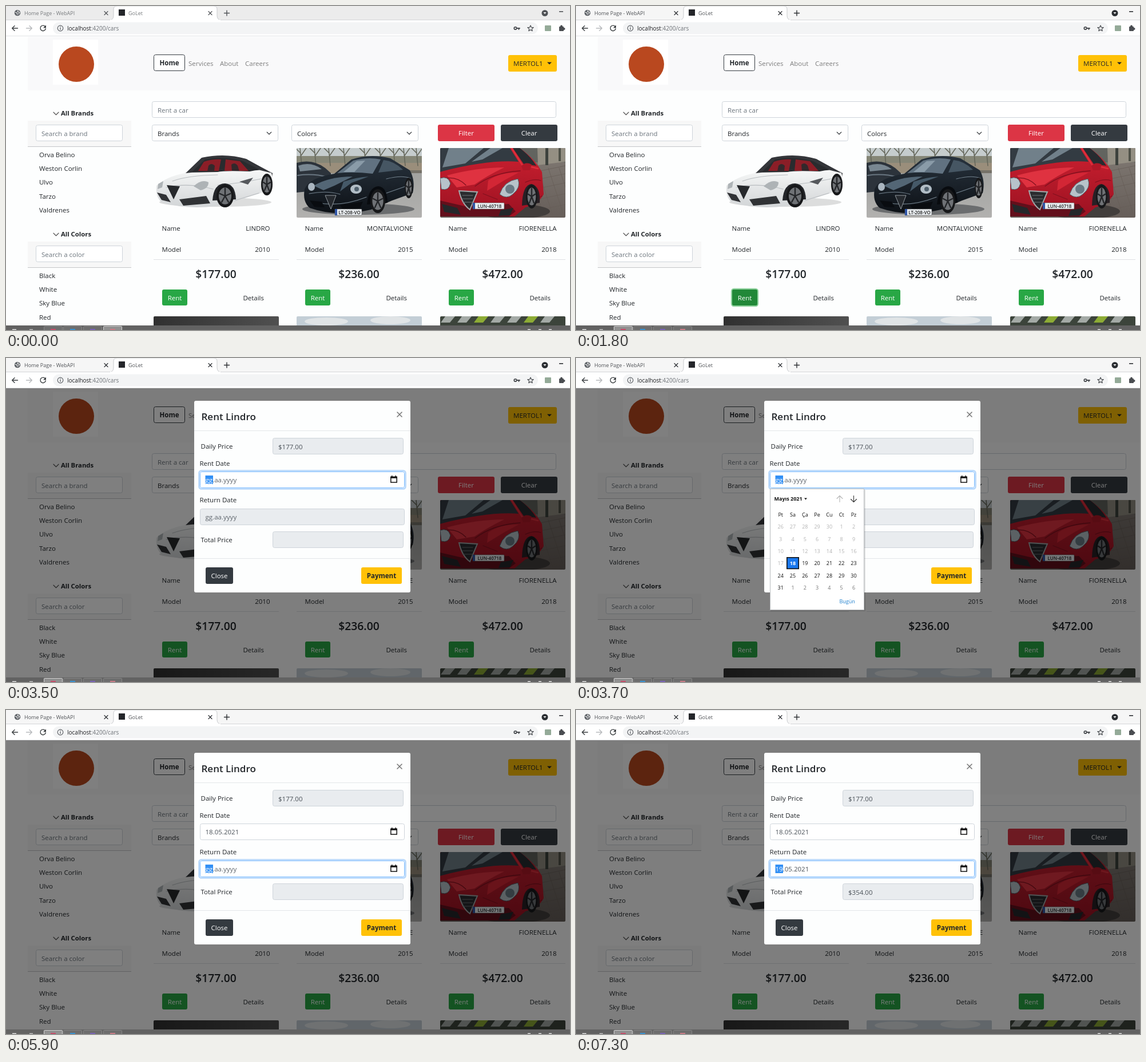
Write an HTML page that moves like this. It is 986 by 568 pixels and loops after 8000 ms.

```html
<!DOCTYPE html>
<html lang="en">
<head>
<meta charset="utf-8">
<title>Car rental</title>
<style>
html, body { margin: 0; width: 100%; height: 100%; overflow: hidden; background: #fff; }
svg { display: block; width: 100%; height: 100%; }
text { font: 11.5px "Open Sans", "Noto Sans", sans-serif; white-space: pre; }
</style>
</head>
<body>
<svg id="stage" viewBox="0 0 986 568"></svg>
<script>
const LOOP = 8000;
const INK = '#212529', GREY = '#6c757d', EDGE = '#ced4da', DARK = '#343a40', AMBER = '#ffc107';

const rect = (x, y, w, h, fill, r = 0, extra = '') =>
  `<rect x="${x}" y="${y}" width="${w}" height="${h}" rx="${r}" fill="${fill}" ${extra}/>`;
const box = (x, y, w, h, fill = '#fff', stroke = EDGE) =>
  rect(x + .5, y + .5, w - 1, h - 1, fill, 3, `stroke="${stroke}"`);
const path = (d, fill, extra = '') => `<path d="${d}" fill="${fill}" ${extra}/>`;
const line = (d, color = INK, width = 1.3) =>
  path(d, 'none', `stroke="${color}" stroke-width="${width}" stroke-linecap="round" stroke-linejoin="round"`);
const disc = (x, y, r, fill, extra = '') => `<circle cx="${x}" cy="${y}" r="${r}" fill="${fill}" ${extra}/>`;
const oval = (x, y, rx, ry, fill) => `<ellipse cx="${x}" cy="${y}" rx="${rx}" ry="${ry}" fill="${fill}"/>`;
const text = (x, y, s, fill = INK, size = 11.5, weight = 400, anchor = 'start') =>
  `<text x="${x}" y="${y}" fill="${fill}" text-anchor="${anchor}" style="font-size:${size}px;font-weight:${weight}">${s}</text>`;
const at = (x, y, body, extra = '') => `<g transform="translate(${x} ${y})" ${extra}>${body}</g>`;
const during = (from, to, body) => `<g data-from="${from}" data-to="${to}">${body}</g>`;
const button = (x, y, w, label, fill, color = '#fff', weight = 400, h = 29) =>
  rect(x, y, w, h, fill, 3) + text(x + w / 2, y + 19, label, color, 11.5, weight, 'middle');
const cross = (x, y, r, color, width) =>
  line(`M${x - r} ${y - r}l${2 * r} ${2 * r}m0 ${-2 * r}l${-2 * r} ${2 * r}`, color, width);
const chevron = (x, y, r = 3.8, color = INK) => line(`M${x - r} ${y - r / 2}l${r} ${r}l${r} ${-r}`, color, 1.2);
const fade = (id, from, to, down = 1) =>
  `<linearGradient id="${id}" x2="${1 - down}" y2="${down}"><stop stop-color="${from}"/><stop offset="1" stop-color="${to}"/></linearGradient>`;
const wheel = (x, y, rx, ry) => oval(x, y, rx, ry, '#17181a') + oval(x, y, rx * .74, ry * .74, '#6f7276') +
  [0, 1, 2, 3, 4].map(i => {
    const a = i * 1.257 - 1.57;
    return line(`M${x} ${y}l${rx * .66 * Math.cos(a)} ${ry * .66 * Math.sin(a)}`, '#25272a', 2.4);
  }).join('');
const plate = (x, y, w, s) => rect(x, y, w, 11, '#e9edf0', 1, 'stroke="#555" stroke-width=".6"') +
  rect(x, y, 4, 11, '#3157a8') + text(x + w / 2 + 2, y + 8.8, s, '#222', 8, 600, 'middle');

// The window is in the background at first and gains focus with the click.
const tabStrip = (strip, label, icon) =>
  rect(0, 0, 986, 25, strip) + line('M0 24.5H182M374 24.5H986', '#d3d5d8', 1) +
  path('M181 25Q188 24 188 17V6Q188 0 194 0H363Q369 0 369 6V17Q369 24 376 25Z', '#fff', 'stroke="#c9cbce"') +
  disc(20, 12, 5.3, '#5f6368') + line('M16 11l3 1l1 3M21 8l-1 2l4 1l-2 3', strip, 1.2) +
  text(32, 15.5, 'Home Page - WebAPI', label, 9) + text(214, 15.5, 'GoLet', label, 9) +
  cross(175, 12.5, 3, icon, 1.2) + cross(357, 12.5, 3, icon, 1.2) + line('M381.5 12.5h9M386 8v9', icon, 1.4) +
  disc(942, 12.5, 5.5, icon) + path('M939.5 11h5l-2.5 3z', '#fff') + rect(967, 9, 7, 1.6, icon);

function browser() {
  return during(0, 1800, tabStrip('#ececec', '#777a7d', '#505357')) +
    during(1800, LOOP, tabStrip('#f6f6f6', '#505357', '#2c2f33')) +
    rect(197, 6, 11, 11, '#24262a') + rect(0, 25, 986, 28, '#fff') + rect(182, 24, 193, 2, '#fff') +
    line('M20.5 39H11M15 34.7L10.7 39L15 43.3', '#3c4043', 1.4) +
    line('M35.5 39H45M41 34.7L45.3 39L41 43.3', '#b8babd', 1.4) +
    line('M68.5 36A4.7 4.7 0 1 0 69.3 40', '#3c4043', 1.4) + path('M70 33.5v5h-5z', '#3c4043') +
    rect(82, 28.5, 848, 21, '#f3f4f5', 10.5) +
    disc(95, 39, 4.8, 'none', 'stroke="#5f6368" stroke-width="1.2"') + rect(94.4, 38, 1.3, 3.8, '#5f6368') +
    rect(94.4, 35.8, 1.3, 1.3, '#5f6368') +
    text(107, 43, 'localhost<tspan fill="#6b6f74">:4200/cars</tspan>', '#202124', 10) +
    disc(890.5, 39, 2.2, 'none', 'stroke="#4a4d51" stroke-width="1.8"') + line('M893 39h5M896.5 39v2', '#4a4d51', 1.9) +
    line('M917 34l1.5 3.4l3.6 .3l-2.8 2.4l.9 3.6l-3.2-2l-3.2 2l.9-3.6l-2.8-2.4l3.6-.3z', '#4a4d51', 1.2) +
    rect(942, 34, 11, 10, '#94aa98', 1) +
    rect(967, 36, 8, 8, '#4a4d51', 1) + disc(971, 35.6, 2, '#4a4d51') + disc(975.5, 40, 2, '#4a4d51') +
    rect(0, 52, 986, 1, '#e3e4e6');
}

function sideList(y, title, hint, items) {
  return chevron(87.5, y + 1, 4.5, '#555') + text(96, y + 4.5, title, INK, 11.3, 700) +
    rect(38, y + 13.5, 181, 46, '#f7f7f7') + rect(38, y + 58.5, 181, 1, '#c4c6c8') +
    box(52, y + 20.5, 152, 29) + text(62, y + 40.5, hint, GREY) +
    items.map((s, i) => text(58, y + 77 + i * 24.4, s)).join('');
}

const whiteCar = () =>
  oval(108, 95, 98, 8, '#dcdddd') +
  path('M58 44L86 17Q125 11 160 19L208 44L204 72L110 76Z', '#292b2e') +
  path('M88 24Q104 19 118 20L114 40H78ZM126 20L151 23L166 40H124Z', '#8b1e27') +
  path('M96 31Q101 25 107 31L106 41H94ZM136 29Q142 24 147 31L150 41H137Z', '#33282b') +
  path('M5 66Q22 50 58 43L112 42Q124 39 168 41Q190 35 206 43Q210 57 206 72L184 80L140 94L108 102Q55 108 14 95Q3 85 5 66Z', 'url(#pearl)') +
  path('M56 44L84 17Q125 8 162 19L207 44L187 39L156 23Q122 14 90 20L66 43Z', '#34363a') +
  line('M33 58Q60 48 112 47M22 69Q62 60 104 72M112 65Q150 62 188 54M142 92L184 79', '#b9bdc0', 1.1) +
  path('M6 78L22 82L30 95L14 91ZM45 90L92 84L99 97L52 101Z', '#303235') +
  path('M23 65L46 67L35 90Z', '#26282b') + path('M70 67Q84 54 96 60Q96 71 82 74Z', '#aeb3b6') +
  path('M8 63L17 58L15 69L7 72Z', '#aeb3b6') + path('M150 59L174 52L165 64Z', '#55585c') +
  path('M103 92Q105 62 125 62Q143 63 144 90Z', '#24262a') + wheel(125, 84, 15, 20) + wheel(198, 64, 10, 19);

const blackCar = () =>
  rect(0, 0, 219, 122, 'url(#road)') + rect(0, 0, 219, 22, '#c5cccd') +
  rect(0, 14, 219, 12, '#858677') + rect(0, 26, 219, 18, '#9a8e7b') + rect(120, 39, 99, 5, '#757269') +
  [6, 31, 56, 82, 118, 145, 169, 187, 209].map(x => line(`M${x} 0l3 31M${x + 2} 13l9-13M${x + 1} 9l-9-9`, '#636559', 1.5)).join('') +
  path('M0 26Q28 18 50 35L60 44V72L0 78Z', '#2c333b') + path('M3 31Q25 23 44 37L6 41Z', '#798791') +
  line('M2 48Q28 44 55 51', '#697681', 2) + disc(47, 61, 8, '#17191d') +
  oval(108, 107, 98, 10, '#6b6d6f') +
  path('M14 72Q22 52 66 45L96 20Q128 9 164 18L198 39Q208 57 203 79L167 92L130 108Q70 122 23 105Q10 94 14 72Z', 'url(#night)') +
  path('M71 44L99 22Q125 15 147 20L133 45Q100 41 71 44Z', '#617281') + path('M82 42L105 23L120 22L101 42Z', '#8a9ba8') +
  path('M152 21Q171 23 186 38L143 43Z', '#465663') +
  path('M30 66Q57 50 98 50L66 66L47 74Z', '#536675') + path('M82 59Q105 51 126 50L96 61L76 76Z', '#455968') +
  line('M22 80Q53 74 76 81M36 96Q77 104 122 86M157 54Q184 47 199 53M157 79L191 67', '#74838f', 1.2) +
  path('M50 83L69 83L60 107Z', '#262a2f', 'stroke="#949ba0"') +
  path('M23 92L44 94L49 104L31 103ZM76 100L116 94L111 105L82 109Z', '#090c10') +
  oval(104, 72, 10, 8, '#b1bdc6') + disc(105, 72, 4, '#50616e') + oval(26, 68, 6, 7, '#a9b5bf') +
  path('M123 99Q126 68 143 67Q158 68 159 96Z', '#080b0f') +
  wheel(142, 93, 13, 21) + wheel(196, 70, 7, 18) + plate(67, 107, 47, 'LT-208-VO');

const redCar = () =>
  rect(0, 0, 219, 122, 'url(#paving)') + rect(110, 0, 109, 25, '#62645f') +
  path('M170 0H219V24L171 30Z', '#948f83') + rect(184, 0, 5, 30, '#3d423d') + rect(207, 0, 4, 23, '#505249') +
  [42, 56, 72, 91, 110].map(y => line(`M166 ${y}l53-11M${y + 98} 35l28 86`, '#675f59', .8)).join('') +
  oval(129, 111, 63, 13, '#423e3c') +
  path('M0 0H139Q165 18 178 42L181 81Q172 98 149 104L130 120H0Z', 'url(#crimson)') +
  path('M0 0H122L137 24Q84 20 3 41L0 42Z', '#333b42') + path('M15 0H76L44 27L4 34ZM88 0H109L74 20L55 24Z', '#71808a') +
  path('M127 0H139Q158 14 168 31L146 28Z', '#262c30') + line('M125 0L143 29L171 36', '#df2f3c', 2.5) +
  path('M142 32Q149 23 160 29L157 39H145Z', '#af1827') +
  path('M12 48Q64 34 112 34Q83 48 60 64L29 69Z', '#df3240') + path('M84 57Q105 42 137 43L113 56L82 75Z', '#d32635') +
  line('M5 54Q28 48 45 65M61 67Q92 43 140 40M75 80L100 90M149 60Q164 53 176 57M151 100L178 84', '#81101e', 1.3) +
  path('M0 92L43 102L120 98L132 111L120 120H0Z', '#630f1b') +
  path('M33 75L65 77L52 108Q38 98 33 75Z', '#292b2e', 'stroke="#a3a6a8" stroke-width="2"') +
  [83, 89, 95].map(y => line(`M39 ${y}h18`, '#6e7174', 1)).join('') +
  path('M104 81Q111 58 136 54Q142 69 127 81Q116 91 104 81Z', '#b7c3ca', 'stroke="#4d555d"') +
  path('M0 53Q14 48 18 62Q15 76 2 72Z', '#b7c3ca', 'stroke="#4d555d"') + oval(122, 72, 8, 8, '#697a85') +
  path('M3 98L30 105L36 117L7 112ZM106 109L128 105L122 118L102 119Z', '#24272a') +
  path('M143 101Q144 64 160 63Q176 68 174 96Z', '#282025') + wheel(160, 85, 10, 21) +
  at(57, 96, plate(0, 0, 55, 'LUN-40718'));

function card(x, photo, name, year, price) {
  return at(x, 249, photo(), 'clip-path="url(#photo)"') +
    text(x + 14.5, 394, 'Name') + text(x + 203.5, 394, name, INK, 11.5, 400, 'end') +
    text(x + 14.5, 430.5, 'Model') + text(x + 203.5, 430.5, year, INK, 11.5, 400, 'end') +
    rect(x, 444, 219, 1, '#dfe1e4') + text(x + 109, 477, price, INK, 19.3, 600, 'middle') +
    button(x + 15, 497, 44, 'Rent', '#28a745', '#fff', 400, 28) + text(x + 193, 515.5, 'Details', INK, 11.5, 400, 'end');
}

function page() {
  return rect(0, 53, 986, 507, '#fdfefe') + rect(38, 54, 948, 94, '#f9f9fa') +
    rect(82, 59, 79, 79, '#fff') + disc(123, 102, 31, '#b9481f') +
    box(258, 85, 55, 29, '#fff', DARK) + text(285.5, 104, 'Home', INK, 11.5, 700, 'middle') +
    text(319, 105, 'Services', '#7d7d7d') + text(374, 105, 'About', '#7d7d7d') + text(418, 105, 'Careers', '#7d7d7d') +
    rect(878, 86, 85, 29, AMBER, 3) + text(887, 105, 'MERTOL1') + path('M946 98.5h8l-4 4z', INK) +
    sideList(187.5, 'All Brands', 'Search a brand', ['Orva Belino', 'Weston Corlin', 'Ulvo', 'Tarzo', 'Valdrenes']) +
    sideList(399.5, 'All Colors', 'Search a color', ['Black', 'White', 'Sky Blue', 'Red']) +
    box(255, 167, 707, 29) + text(265, 187, 'Rent a car', GREY) +
    box(255, 208, 221, 29) + text(265, 227.5, 'Brands') + chevron(460, 223) +
    box(499, 208, 222, 29) + text(509, 227.5, 'Colors') + chevron(705, 223) +
    button(755, 208, 99, 'Filter', '#dc3545') + button(865, 208, 99, 'Clear', DARK) +
    card(258, whiteCar, 'LINDRO', '2010', '$177.00') +
    card(508, blackCar, 'MONTALVIONE', '2015', '$236.00') +
    card(759, redCar, 'FIORENELLA', '2018', '$472.00') +
    during(1400, 1900, button(273, 497, 44, 'Rent', '#218838', '#fff', 400, 28)) +
    during(1800, 1900, rect(272, 496, 46, 30, 'none', 4, 'stroke="#28a745" stroke-opacity=".5" stroke-width="2.3"')) +
    rect(258, 544, 219, 20, 'url(#dusk)', 2) +
    rect(508, 544, 219, 20, '#c3ced6', 2) + oval(560, 553, 38, 7, '#e0e4e6') + oval(672, 551, 35, 7, '#e0e4e6') +
    rect(759, 544, 219, 20, '#3c443b', 2) +
    [0, 1, 2, 3, 4, 5, 6].map(i => path(`M${768 + i * 29} 544h17l-9 11h-16z`, i % 3 === 2 ? '#8dac35' : '#a4aaa6')).join('');
}

function taskbar() {
  const slots = [67, 101, 136, 171], hues = ['#c24d68', '#388fcd', '#7862b4', '#c77b84'];
  const glow = i => rect(slots[i] - .5, 561.5, 32, 9, '#909090', 1, 'stroke="#d5d5d5"');
  return rect(0, 560, 986, 8, '#626262') +
    slots.map(x => rect(x - .5, 561.5, 32, 9, '#6d6d6d', 1, 'stroke="#858585"')).join('') +
    during(0, 1800, glow(3)) + during(1800, LOOP, glow(0)) +
    slots.map((x, i) => rect(x + 11, 566, 9, 2, hues[i])).join('') +
    rect(11, 566.5, 7, 1.5, '#ddd') + rect(41, 566.5, 6, 1.5, '#bbb') +
    [912, 931, 949].map(x => rect(x, 566.5, 5, 1.5, '#ddd')).join('');
}

const dateIcon = y => path(`M672.8 ${y + 9.5}h10.4v9.5h-10.4z`, 'none', 'stroke="#111" stroke-width="1.5"') +
  rect(672, y + 8.8, 12, 3, '#111') + rect(674, y + 7, 1.5, 3, '#111') + rect(680.5, y + 7, 1.5, 3, '#111');

function dateField(y, value, { open = true, focus = false } = {}) {
  const tone = value[0] === 'g' ? '#5c636a' : '#495057';
  const [first, rest] = [value.slice(0, 2), value.slice(2)];
  return (focus ? rect(337.5, y - 1.5, 361, 32, 'none', 4, 'stroke="#b8d8fb" stroke-width="2.6"') : '') +
    box(339, y, 358, 29, open ? '#fff' : '#e9ecef', focus ? '#80bdff' : EDGE) +
    (focus ? rect(348.5, y + 7, 13.5, 15, '#3390f5') : '') +
    text(348.5, y + 19, `<tspan fill="${focus ? '#fff' : tone}">${first}</tspan>${rest}`, tone) +
    (open ? dateIcon(y) : '');
}

function calendar(y, hovers = '') {
  const small = (x, dy, s, fill, weight) => text(x, dy, s, fill, 9, weight, 'middle');
  const col = i => 18.7 + i % 7 * 21.3;
  const head = ['Pt', 'Sa', 'Ça', 'Pe', 'Cu', 'Ct', 'Pz'].map((s, i) => small(col(i), 48.5, s, '#111')).join('');
  let days = '';
  for (let i = 0; i < 42; i++) {
    const day = i < 5 ? 26 + i : i < 36 ? i - 4 : i - 35;
    const today = i === 22;
    const fill = today ? '#fff' : i < 22 ? '#b3b3b3' : i < 36 ? '#111' : '#757575';
    days += small(col(i), 70.2 + Math.floor(i / 7) * 21.4, day, fill, today ? 700 : 400);
  }
  return at(339, y,
    rect(1, 2, 166, 213, '#000', 0, 'opacity=".12"') + rect(.5, .5, 164, 212, '#fff', 0, 'stroke="#b9bcbf"') +
    text(7.5, 21, 'Mayıs 2021', '#111', 9, 700) + path('M60 16.5h5l-2.5 3z', '#111') +
    line('M122 23.5V13M117 17.5l5-5l5 5', '#b5b5b5', 1.1) + line('M146.5 12.5V23M141.5 18.5l5 5l5-5', '#333', 1.1) +
    hovers + rect(29.8, 120.8, 20.4, 19.6, '#1a78ee', 0, 'stroke="#111" stroke-width="1.6"') +
    head + days + text(121.5, 201, 'Bugün', '#1a7dcc', 9));
}

function modal() {
  const priceField = (y, s = '') => box(466, y, 229, 29, '#e9ecef') + text(476, y + 20, s, '#495057');
  const hover = x => rect(x, 120, 21, 21, '#aed2f8');
  return rect(0, 53, 986, 507, '#000', 0, 'opacity=".5"') +
    rect(329, 75, 378, 336, '#fdfefe', 3) + rect(329, 127, 378, 1, '#e3e6e9') + rect(329, 351, 378, 1, '#e3e6e9') +
    text(341.5, 108.5, 'Rent Lindro', INK, 17, 600) +
    during(1900, 3500, cross(688, 99, 4, '#111', 1.6)) + during(3500, LOOP, cross(688, 99, 4, '#777', 1.6)) +
    text(340.5, 159, 'Daily Price') + priceField(140, '$177.00') +
    text(338.5, 188.5, 'Rent Date') + text(338.5, 253, 'Return Date') + text(340.5, 323, 'Total Price') +
    during(1900, 7300, priceField(304)) + during(7300, LOOP, priceField(304, '$354.00')) +
    button(349, 367, 48, 'Close', DARK) + button(621, 367, 71, 'Payment', AMBER, INK, 700) +
    during(1900, 3500, dateField(199, 'gg.aa.yyyy')) +
    during(3500, 4900, dateField(199, 'gg.aa.yyyy', { focus: true })) +
    during(4900, 5900, dateField(199, '18.05.2021', { focus: true })) +
    during(5900, LOOP, dateField(199, '18.05.2021')) +
    during(1900, 4900, dateField(264, 'gg.aa.yyyy', { open: false })) +
    during(4900, 5900, dateField(264, 'gg.aa.yyyy')) +
    during(5900, 7200, dateField(264, 'gg.aa.yyyy', { focus: true })) +
    during(7200, LOOP, dateField(264, '19.05.2021', { focus: true })) +
    during(3600, 4900, calendar(229)) +
    during(6000, 7200, calendar(293, during(6300, 6400, hover(72)) + during(6400, 7200, hover(51))));
}

const stage = document.getElementById('stage');
stage.innerHTML =
  `<defs><clipPath id="photo">${rect(0, 0, 219, 122, '#fff', 2)}</clipPath>` +
  fade('pearl', '#f6f7f7', '#d2d5d7') + fade('road', '#989a98', '#b2b1af') + fade('night', '#28333e', '#0d1116') +
  fade('paving', '#817a74', '#665e59') + fade('crimson', '#cc2030', '#9c1222') + fade('dusk', '#303030', '#505050', 0) +
  '</defs>' + page() + during(1900, LOOP, modal()) + taskbar() + browser();

const phases = [...stage.querySelectorAll('[data-from]')];
function draw() {
  const t = performance.now() % LOOP;
  for (const p of phases) {
    p.style.display = t >= +p.dataset.from && t < +p.dataset.to ? '' : 'none';
  }
  requestAnimationFrame(draw);
}
draw();
</script>
</body>
</html>
```
